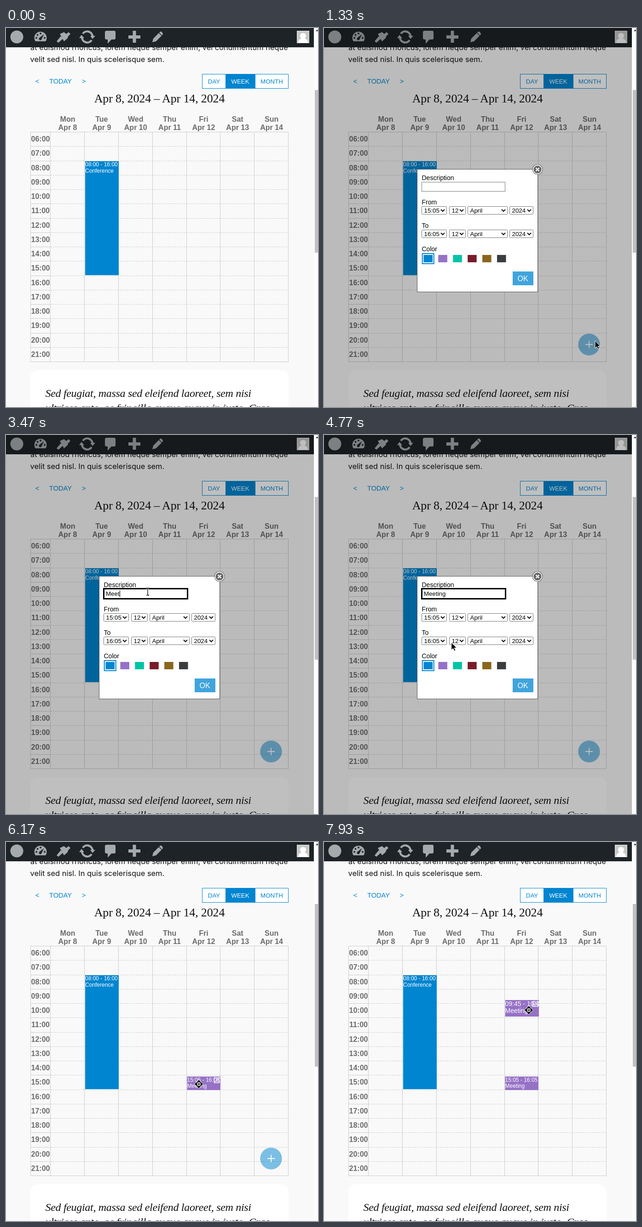
These frames come from a looping animation (678 px wide and 825 px high, 8 s). An HTML page:

```html
<!DOCTYPE html>
<html lang="en">
<head>
<meta charset="utf-8">
<title>Week calendar</title>
<style>
  html, body { margin: 0; width: 100%; height: 100%; overflow: hidden; background: #f9f9f9; }
  svg { display: block; width: 678px; height: 825px; font: 14px "Liberation Sans", Arial, sans-serif; }
  .mid { text-anchor: middle; }
  .body { font: 16.4px Inter, sans-serif; fill: #111; }
  .title { font: 26px "Liberation Serif", serif; letter-spacing: -.15px; fill: #111; }
  .quote { font: italic 24px "Liberation Serif", serif; letter-spacing: -.31px; fill: #111; }
  .head { font-weight: bold; font-size: 16px; fill: #6b6b6b; }
  .nav { font-size: 14.6px; fill: #0085d0; }
  .ctl { font-size: 13.33px; }
  .small { font-size: 12px; fill: #fff; }
  .large { font-size: 14px; fill: #fff; }
  .grid { stroke: #ccc; shape-rendering: crispEdges; }
  .icon { fill: #a7aaad; }
  .line { fill: none; stroke: #a7aaad; }
</style>
</head>
<body>
<svg id="stage" viewBox="0 0 678 825" xmlns="http://www.w3.org/2000/svg"></svg>
<script>
const BLUE = '#0085d0', PURPLE = '#9671c6';
const SWATCHES = [BLUE, PURPLE, '#00c4a7', '#781c2a', '#8a671c', '#3a3d40'];
const GRID_TOP = 226.2, ROW = 31.25, COL = 73.85;

const text = (x, y, s, cls = '', extra = '') => `<text x="${x}" y="${y}" class="${cls}" ${extra}>${s}</text>`;
const rect = (x, y, w, h, fill, extra = '') =>
  `<rect x="${x}" y="${y}" width="${w}" height="${h}" fill="${fill}" ${extra}/>`;
const path = (d, extra = '') => `<path d="${d}" ${extra}/>`;
const range = (n, f) => Array.from({ length: n }, (_, i) => f(i)).join('');
const pad = n => String(n).padStart(2, '0');
const clock = h => `${pad(Math.floor(h))}:${pad(Math.round(h % 1 * 60))}`;

function adminBar() {
  return rect(0, 0, 669, 42, '#1d2327') + `<g class="icon">
    <circle cx="23.5" cy="19.5" r="14"/>
    <path d="M64 29A13.4 13.4 0 1 1 86 29Z"/>
    <g fill="#1d2327"><circle cx="75" cy="12" r="1.9"/><circle cx="68.5" cy="15" r="1.9"/>
      <circle cx="66" cy="21.5" r="1.9"/><circle cx="84" cy="21.5" r="1.9"/>
      <path d="M82.500 13.500L77.500 24A3 3 0 1 1 73 21Z"/></g>
    <path d="M117 13L126 9L131 13L136 9L140 13L135 18L134 22L126 29Z"/>
    <path d="M119 18L124 23L114 32L110 29Z"/>
    <path d="M219 6H235Q238 6 238 9V22Q238 25 235 25H229L221 34V25H219Q215 25 215 22V9Q215 6 219 6Z"/>
    <path d="M275.500 6H282.500V16H292V23H282.500V32H275.500V23H266V16H275.500Z"/>
    <path d="M318 31L320 23L332 11L338 17L326 29ZM333 10L335 8Q337 7 339 9L340 11Q342 13 340 15L339 16Z"/>
    <path d="M183 17H194L188 24ZM159 22H170L164 15Z"/>
    <path d="M188 19A11.500 11.500 0 0 0 167 12.500M165 20A11.500 11.500 0 0 0 186 26.500" class="line" stroke-width="4.500"/>
    </g>` +
    rect(632.5, 6.5, 26, 26, '#c8c8c8', 'stroke="#e8e8e8"') +
    path('M635 32Q635 24 642 23Q639 20 639 16Q640 11 645.500 11Q651 11 652 16Q652 20 649 23Q656 24 656 32Z', 'fill="#fff"');
}

function calendar() {
  const right = 613, bottom = 726;
  const days = ['Mon', 'Tue', 'Wed', 'Thu', 'Fri', 'Sat', 'Sun'];
  const vline = x => path(`M${x + .5} 226V${bottom + 1}`, 'class="grid"');
  const hline = (x0, x1, y, dash = '') => path(`M${x0} ${y + .5}H${x1}`, `class="grid" ${dash}`);
  return rect(426.5, 100.5, 187, 31, '#fff', `stroke="${BLUE}"`) +
    rect(477, 100, 65, 32, BLUE) +
    text(452, 121, 'DAY', 'mid ctl', `fill="${BLUE}"`) +
    text(509, 121, 'WEEK', 'mid ctl', 'fill="#fff"') +
    text(577.5, 121, 'MONTH', 'mid ctl', `fill="${BLUE}"`) +
    text(68, 120.5, '&lt;', 'mid nav') + text(118.5, 120.5, 'TODAY', 'mid nav') + text(169, 120.5, '&gt;', 'mid nav') +
    text(333.5, 162, 'Apr 8, 2024 – Apr 14, 2024', 'mid title') +
    range(7, i => text(134 + COL * i, 204, days[i], 'mid head') + text(134 + COL * i, 221.5, `Apr ${8 + i}`, 'mid head')) +
    range(16, i => text(75, 247 + ROW * i, clock(6 + i), 'mid head')) +
    range(15, i => {
      const y = Math.round(GRID_TOP + ROW * (i + 1));
      return hline(53, 97, y) + hline(97, right, y, 'stroke-dasharray="3 2"');
    }) +
    hline(53, right + 1, 226) + hline(53, right + 1, bottom) +
    vline(53) + range(8, i => vline(Math.floor(96.6 + COL * i)));
}

const editIcon = (x, y) => `<g transform="translate(${x} ${y})" fill="none" stroke="#fff" stroke-width="1.600">
  <path d="M8 2H1.500V13H12.500V7"/><path d="M5 10L6 7L12 1L14 3L8 9Z" stroke-width="1.300"/></g>`;

function dialog() {
  const select = (x, y, w, label) => rect(x + .5, y + .5, w - 1, 17, '#fff', 'rx="1" stroke="#767676"') +
    text(x + 5.5, y + 14, label, 'ctl') +
    path(`M${x + w - 13} ${y + 7}l4 4l4 -4`, 'fill="none" stroke="#111" stroke-width="2"');
  const date = (y, time) => select(212, y, 55, time) + select(272, y, 36, '12') +
    select(312, y, 87, 'April') + select(403, y, 52, '2024');
  return rect(202.5, 307.5, 262, 267, '#fff', 'stroke="#555"') +
    text(212.5, 331, 'Description') + text(212.5, 384, 'From') + text(212.5, 435, 'To') + text(212.5, 486, 'Color') +
    date(388, '15:05') + date(439, '16:05') +
    range(6, i => rect(216.5 + 31.9 * i, 494, 19.5, 16, SWATCHES[i])) +
    '<rect id="picked" y="491" width="25" height="22" fill="none" stroke-width="2"/>' +
    rect(410, 530, 45, 30, '#40a4dc') + text(432, 551, 'OK', 'mid', 'fill="#fff" font-size="16"') +
    '<rect id="field" fill="#fff"/>' + text(217, 350, '', 'ctl', 'id="typed"') +
    rect(217, 338, 1, 15, '#000', 'id="caret"') +
    `<circle cx="464" cy="308" r="11.300" fill="#555"/><circle cx="464" cy="308" r="9.500" fill="#666" stroke="#fff" stroke-width="1.800"/>` +
    path('M460.500 304.500l7 7m0 -7l-7 7', 'stroke="#fff" stroke-width="2.400"');
}

function cursors() {
  const beam = 'M-3 -8Q0 -8 0 -6Q0 -8 3 -8M0 -6V6M-3 8Q0 8 0 6Q0 8 3 8';
  const arms = [0, 90, 180, 270].map(a =>
    `<path d="M0 -9L4.500 -4.500H-4.500Z" transform="rotate(${a})"/>`).join('');
  return `<g id="arrow"><path d="M0 0V16L3.800 12.500L6.300 18L9 16.800L6.500 11.500H11.500Z" stroke="#fff" stroke-width="1"/></g>
    <g id="beam" fill="none"><path d="${beam}" stroke="#fff" stroke-width="3"/><path d="${beam}" stroke="#000" stroke-width="1.300"/></g>
    <g id="move"><g stroke="#fff" stroke-width="1.400">${arms}</g>${arms}
      <circle r="4.800" fill="#fff" stroke="#000" stroke-width="1.600"/><circle r="2" fill="#aaa" stroke="#000" stroke-width="1.200"/></g>`;
}

document.getElementById('stage').innerHTML =
  rect(0, 0, 669, 825, '#f9f9f9') +
  text(53, 48, 'at euismod rhoncus, lorem neque semper enim, vel condimentum neque', 'body') +
  text(52.5, 74, 'velit sed nisl. In quis scelerisque sem.', 'body') +
  calendar() +
  rect(172, 290, 73, 248, BLUE) + text(172, 301, '08:00 - 16:00', 'small') + text(172, 314.5, 'Conference', 'small') +
  `<g id="meeting">${rect(393.5, 510.5, 72.5, 29.5, PURPLE)}${text(393.5, 521.5, '15:05 - 16:05', 'small')}
    ${text(393.5, 535, 'Meeting', 'small')}<g id="edit">${editIcon(451, 511)}</g></g>` +
  `<clipPath id="box"><rect width="73.500" height="36"/></clipPath>
   <g id="drag"><g clip-path="url(#box)">${rect(0, 0, 73.5, 36, PURPLE)}${text(0, 13, '', 'large', 'id="slot"')}
    ${text(0, 28, 'Meeting', 'large')}</g>${editIcon(58.5, 1)}</g>` +
  rect(53, 745, 561, 100, '#fff', 'rx="16"') +
  text(85.5, 803, 'Sed feugiat, massa sed eleifend laoreet, sem nisi', 'quote') +
  text(85.5, 835, 'ultrices ante, ac fringilla augue augue in justo. Cras', 'quote') +
  `<g id="add"><circle cx="576" cy="689" r="23.700" fill="${BLUE}" opacity=".5"/>
    ${path('M568 689H584M576 681V697', 'stroke="#fff" stroke-width="1.800"')}</g>` +
  adminBar() +
  `<g id="modal">${rect(0, 0, 669, 825, '#000', 'opacity=".25"')}${dialog()}</g>` +
  rect(669, 0, 9, 825, '#fcfcfc') + rect(671, 135, 7, 354, '#c1c1c1') + path('M673 7L676 3L679 7Z', 'fill="#444"') +
  cursors();

const el = {};
document.querySelectorAll('[id]').forEach(n => el[n.id] = n);

// [ms, x, y]; a repeated time is a hard jump
const POINTER = [
  [130, 100, 0], [830, 470, 565], [1330, 470, 565], [1330, 589, 681], [1830, 309, 328], [2000, 309, 328],
  [2130, 308, 341], [4400, 308, 341], [5030, 259, 515], [5230, 259, 515], [5480, 472, 548], [5700, 432, 558],
  [6170, 432, 558], [6170, 419, 527], [6500, 444, 531], [6830, 444, 531], [6970, 447, 440], [7130, 447, 440],
  [7370, 449, 354], [7530, 449, 354], [7570, 445, 360], [7770, 445, 360], [7930, 445, 366]
];
const DRAG = [
  [6830, 393.5, 511], [6970, 397, 420], [7130, 397, 420], [7370, 398, 335], [7770, 398, 335], [7930, 393.5, 344]
];
const KEYS = [3000, 3100, 3300, 3470, 3570, 3700, 3800];
const CARET = [[2300, 2830], [3000, 4400], [4930, 5430]];

function at(track, t) {
  const i = track.findLastIndex(k => k[0] <= t);
  if (i < 0) return track[0].slice(1);
  const a = track[i], b = track[i + 1] || a;
  const p = b[0] > a[0] ? (t - a[0]) / (b[0] - a[0]) : 0;
  const e = (1 - Math.cos(Math.PI * p)) / 2;
  return [a[1] + (b[1] - a[1]) * e, a[2] + (b[2] - a[2]) * e];
}

const show = (node, on) => node.setAttribute('visibility', on ? 'inherit' : 'hidden');
const set = (node, attrs) => Object.entries(attrs).forEach(([k, v]) => node.setAttribute(k, v));
const place = (node, [x, y]) => node.setAttribute('transform', `translate(${x.toFixed(2)} ${y.toFixed(2)})`);

function render(t) {
  const pos = at(POINTER, t);
  const kind = t < 130 ? '' : t >= 6170 ? 'move'
    : t > 2030 && t < 5230 && pos[1] > 333 && pos[1] < 357 ? 'beam' : 'arrow';
  for (const k of ['arrow', 'beam', 'move']) {
    show(el[k], k === kind);
    place(el[k], pos);
  }

  show(el.add, t >= 130 && pos[1] > 100 && t < 6830);
  show(el.modal, t >= 1330 && t < 6170);
  show(el.meeting, t >= 6170);
  show(el.edit, t >= 6170 && t < 6830);

  const focus = t >= 2300;
  set(el.field, focus
    ? { x: 212.5, y: 334.5, width: 182, height: 22, stroke: '#000', 'stroke-width': 3 }
    : { x: 212.5, y: 335.5, width: 181, height: 20, stroke: kind === 'beam' ? '#444' : '#767676', 'stroke-width': 1 });
  el.typed.textContent = 'Meeting'.slice(0, KEYS.filter(k => k <= t).length);
  el.caret.setAttribute('x', 217 + Math.round(el.typed.getComputedTextLength()));
  show(el.caret, CARET.some(([a, b]) => t >= a && t < b));
  const pick = t < 5230 ? 0 : 1;
  set(el.picked, { x: 213.7 + 31.9 * pick, stroke: SWATCHES[pick] });

  const box = at(DRAG, t);
  const start = 6 + Math.round((box[1] - GRID_TOP) / ROW * 4) / 4;
  show(el.drag, t >= 6830);
  place(el.drag, box);
  el.slot.textContent = `${clock(start)} - ${clock(start + 1)}`;
}

const t0 = performance.now();
function tick() {
  render((performance.now() - t0) % 8000);
  requestAnimationFrame(tick);
}
tick();
</script>
</body>
</html>
```
